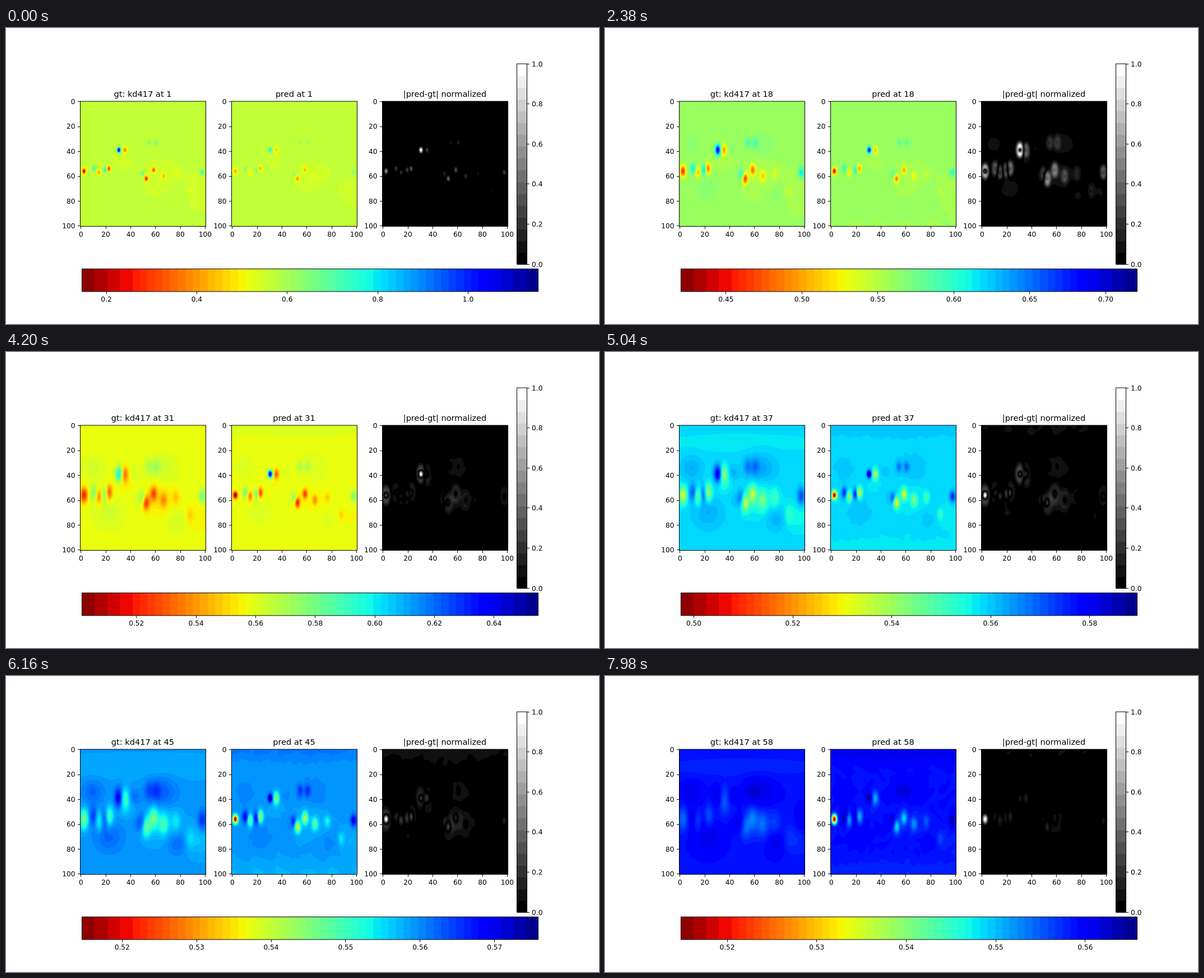
Write an HTML page with a canvas that moves like this. It is 1058 px wide and 529 px high and loops after 8 s.

```html
<!DOCTYPE html>
<html lang="en">
<head>
<meta charset="utf-8">
<title>Field comparison</title>
<style>
html, body { margin: 0; width: 100%; height: 100%; overflow: hidden; background: #fff; }
canvas, svg { position: absolute; left: 0; top: 0; width: 100%; height: 100%; display: block; }
text { font: 12.2px "DejaVu Sans", sans-serif; fill: #000; }
.title { font-size: 14.55px; text-anchor: middle; }
.mid { text-anchor: middle; }
.end { text-anchor: end; }
.line { fill: none; stroke: #000; stroke-width: 1; }
</style>
</head>
<body>
<canvas id="plot" width="1058" height="529"></canvas>
<svg id="axes" viewBox="0 0 1058 529"></svg>
<script>
const LOOP = 8000, STEP = 140, SIZE = 224, CELL = 2.22, TOP = 131;
const BAR = { x: 135.5, y: 430.5, w: 814, h: 40.5 };
const svg = document.getElementById('axes');
const ctx = document.getElementById('plot').getContext('2d');

const clamp = (v, a, b) => Math.min(b, Math.max(a, v));
const ramp = (v, a, b) => clamp((v - a) / (b - a), 0, 1);
const bell = (v, c, s) => Math.exp(-((v - c) ** 2) / (2 * s * s));
const snap = v => Math.floor(v) + .5;
const left = i => snap(132.5 + 269.6 * i);

// x, y, starting strength; the first two span the color range
const SPOTS = [
  [3, 56, -.36], [31, 39, .6], [36, 39, -.2], [11, 54, .18], [15, 57, -.16], [20, 55, .2],
  [23, 54, -.28], [50, 58, .12], [53, 62, -.32], [59, 55, -.24], [67, 60, -.12],
  [77, 58, -.06], [98, 57, .2], [55, 33, .09], [61, 33, .09], [88, 72, -.05]
];
// x, y, strength in thousandths, radius
const POOLS = [
  [10, 34, 5, 6], [66, 35, 6, 8], [23, 70, 5, 8], [78, 75, 5, 6], [43, 38, 4, 4],
  [48, 60, 4, 4], [65, 59, -6, 9], [35, 47, -4, 5], [95, 73, -4, 8]
];
// step, lowest and highest value of the color scale
const RANGE = [
  [1, .146, 1.155], [14, .386, .772], [23, .4676, .6614], [31, .5017, .6548],
  [37, .4974, .5896], [45, .5146, .57585], [58, .51483, .5658]
];

function limits(n) {
  const i = Math.max(1, RANGE.findIndex(r => r[0] >= n));
  const a = RANGE[i - 1], b = RANGE[i], f = ramp(n, a[0], b[0]);
  return [1, 2].map(k => a[k] * (b[k] / a[k]) ** f);
}

function field(blobs) {
  const out = new Float32Array(SIZE * SIZE);
  for (const [x, y, a, sx, sy] of blobs) {
    const span = (c, s) => [Math.max(0, Math.floor((c - 3.6 * s) * CELL)),
      Math.min(SIZE - 1, Math.ceil((c + 3.6 * s) * CELL))];
    const [x0, x1] = span(x, sx), [y0, y1] = span(y, sy);
    const row = [];
    for (let i = x0; i <= x1; i++) row.push(a * bell(i / CELL, x, sx));
    for (let j = y0; j <= y1; j++) {
      const b = bell(j / CELL, y, sy);
      for (let i = x0; i <= x1; i++) out[j * SIZE + i] += b * row[i - x0];
    }
  }
  return out;
}

// strong and positive spots fade sooner
const fade = (a, m) => a * Math.exp(-(.062 + .036 * Math.abs(a)) * m - (a > 0 ? .00015 * m * m : 0));
const pools = (m, scale) => POOLS.map(([x, y, a, s]) =>
  [x, y, a * scale * .0023 * Math.exp(-.03 * m), s, 1.1 * s]);
const late = m => ramp(m, 9, 29);

function truth(m) {
  const spots = SPOTS.map(([x, y, a]) => [x, y, fade(a, m), 1 + .032 * m, 1.5 + .09 * m]);
  return field([...spots, ...pools(m, 1), [50, 14, -.0012 * late(m), 60, 7]]);
}

function guess(m, ends) {
  const reach = Math.min(1, .35 + m / 35);
  const spots = SPOTS.map(([x, y, a], i) => {
    const thin = i < 2 ? .4 : 1;
    const v = i < 2 ? ends[i] * reach : .5 * fade(a, m) * Math.exp(.026 * m);
    return [x, y, v, 1.1 + .012 * thin * m, 1.6 + .04 * thin * m];
  });
  const w = late(m);
  const out = field([...spots, ...pools(m, .45), [50, 0, .002 * w, 90, 7], [50, 100, -.0014 * w, 90, 8]]);
  return out.map((v, p) => {
    const x = p % SIZE / CELL, y = p / SIZE / CELL;
    return v + .0003 * w * Math.sin(.31 * x + 2 * Math.sin(.17 * y)) * Math.sin(.27 * y + Math.sin(.4 * x));
  });
}

// reversed jet, cut into flat bands that are wider at both ends
function jet(u) {
  const size = u < .11 || u > .89 ? .0275 : .0165;
  const from = u < .11 ? 0 : u > .89 ? .89 : .11;
  const v = 1 - Math.min(1, from + (Math.floor((u - from) / size) + .5) * size);
  return [
    ramp(v, .35, .66) - .5 * ramp(v, .89, 1),
    ramp(v, .125, .375) - ramp(v, .64, .91),
    .5 + .5 * ramp(v, 0, .11) - ramp(v, .34, .65)
  ].map(c => Math.round(255 * clamp(c, 0, 1)));
}
const JET = Array.from({ length: 1001 }, (_, i) => jet(i / 1000));
const GRAYS = Array.from({ length: 17 }, (_, i) => Array(3).fill(Math.round(i * 255 / 16)));

function paint(panel, data, color) {
  const img = ctx.createImageData(SIZE, SIZE);
  data.forEach((v, p) => {
    const c = color(v);
    for (let k = 0; k < 3; k++) img.data[4 * p + k] = c[k];
    img.data[4 * p + 3] = 255;
  });
  ctx.putImageData(img, Math.floor(left(panel)), TOP);
}

function add(tag, attrs, words, parent = svg) {
  const el = document.createElementNS('http://www.w3.org/2000/svg', tag);
  for (const k in attrs) el.setAttribute(k, attrs[k]);
  if (words !== undefined) el.textContent = words;
  return parent.appendChild(el);
}
const line = (d, parent) => add('path', { class: 'line', d }, undefined, parent);
const box = (x, y, width, height) => add('rect', { class: 'line', x, y, width, height });

const titles = [0, 1, 2].map(i => {
  const x = left(i);
  box(x, TOP, SIZE, SIZE - .5);
  for (let k = 0; k < 6; k++) {
    const tx = x + 1.3 + 44.3 * k, ty = TOP + .8 + 44.4 * k;
    line(`M${snap(tx)} 354.5v4.5M${x} ${snap(ty)}h-4.5`);
    add('text', { class: 'mid', x: tx, y: 373 }, 20 * k);
    add('text', { class: 'end', x: x - 9, y: ty + 4.2 }, 20 * k);
  }
  return add('text', { class: 'title', x: x + 111.5, y: 123 }, '|pred-gt| normalized');
});

// gray scale
GRAYS.forEach((g, i) => {
  const h = 358 / 17;
  ctx.fillStyle = `rgb(${g})`;
  ctx.fillRect(912, Math.round(422 - (i + 1) * h), 18, Math.ceil(h));
});
box(911.5, 64, 18, 358);
for (let k = 0; k < 6; k++) {
  const y = 422 - 71.6 * k;
  line(`M929.5 ${snap(y)}h4.5`);
  add('text', { x: 938, y: y + 4.5 }, (k / 5).toFixed(1));
}

// color scale
for (let i = 0; i < BAR.w; i++) {
  ctx.fillStyle = `rgb(${jet((i + .5) / BAR.w)})`;
  ctx.fillRect(136 + i, 431, 1, 40);
}
box(BAR.x, BAR.y, BAR.w, BAR.h);
const ticks = add('g', {});

function drawTicks(lo, hi) {
  ticks.replaceChildren();
  const least = (hi - lo) / 9, mag = 10 ** Math.floor(Math.log10(least));
  const unit = [1, 2, 2.5, 5, 10].find(s => s * mag >= least);
  const step = unit * mag;
  const places = Math.round(-Math.log10(mag)) + (unit === 2.5 ? 1 : unit === 10 ? -1 : 0);
  for (let k = Math.ceil(lo / step); k * step <= hi; k++) {
    const x = BAR.x + (k * step - lo) / (hi - lo) * BAR.w;
    line(`M${snap(x)} 471v4.5`, ticks);
    add('text', { class: 'mid', x, y: 489.2 }, (k * step).toFixed(places), ticks);
  }
}

function draw(n) {
  const m = n - 1, [lo, hi] = limits(n);
  const base = .558 + .001 * ramp(n, 31, 45);
  const gt = truth(m), pred = guess(m, [lo - base, hi - base]);
  const gap = pred.map((v, p) => Math.abs(v - gt[p]));
  const most = gap.reduce((a, b) => Math.max(a, b));
  const tint = v => JET[Math.round(1000 * ramp(base + v, lo, hi))];
  paint(0, gt, tint);
  paint(1, pred, tint);
  paint(2, gap, v => GRAYS[Math.min(16, Math.floor(v / most * 17))]);
  titles[0].textContent = `gt: kd417 at ${n}`;
  titles[1].textContent = `pred at ${n}`;
  drawTicks(lo, hi);
}

let shown = 0;
const start = performance.now();
function tick(now) {
  const n = Math.floor((Math.max(0, now - start) % LOOP) / STEP) + 1;
  if (n !== shown) draw(shown = n);
  requestAnimationFrame(tick);
}
tick(start);
</script>
</body>
</html>
```
